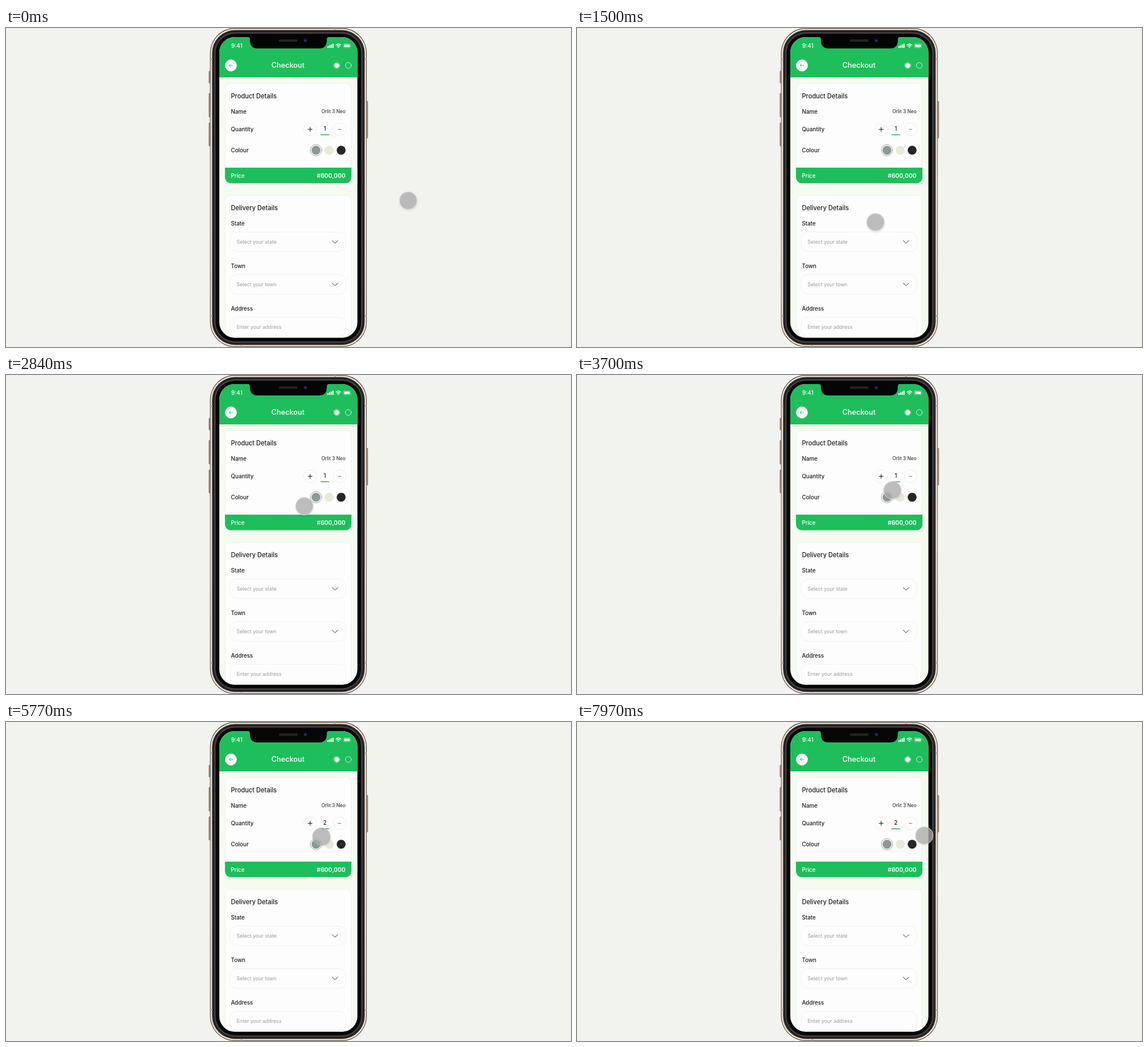
An HTML page for the animation above (8 s loop, 996 by 562 pixels).

```html
<!DOCTYPE html>
<html lang="en">
<head>
<meta charset="utf-8">
<title>Checkout</title>
<style>
  html, body { margin: 0; width: 100%; height: 100%; overflow: hidden; background: #f2f2ee; }
  svg { display: block; width: 996px; height: 562px; }
  text { font-family: Inter, "Open Sans", sans-serif; font-weight: 500; fill: #1b1b1b; }
  .title { font-size: 11.1px; }
  .label { font-size: 9.8px; }
  .hint { font-size: 8.9px; font-weight: 400; fill: #9a9a9a; }
  .light { fill: #fff; }
  .line { fill: none; stroke-linecap: round; stroke-linejoin: round; }
  .card { fill: #fdfdfd; stroke: #ebf3e7; }
  .field { fill: #fdfdfd; stroke: #f0f2ea; }
</style>
</head>
<body>
<svg viewBox="0 0 996 562">
  <defs>
    <clipPath id="screen"><rect x="376" y="16" width="243.5" height="529.5" rx="27"/></clipPath>
    <linearGradient id="rim" x2="0" y2="1">
      <stop stop-color="#57483c"/><stop offset=".5" stop-color="#8a7560"/><stop offset="1" stop-color="#5d4d40"/>
    </linearGradient>
    <filter id="soft" x="-50%" y="-50%" width="200%" height="200%"><feGaussianBlur stdDeviation="1.5"/></filter>
  </defs>

  <g id="phone">
    <g fill="#a58d79" stroke="#6b594b" stroke-width=".6">
      <rect x="357.8" y="76" width="3" height="21" rx="1"/>
      <rect x="357.8" y="115" width="3" height="42" rx="1"/>
      <rect x="357.8" y="167" width="3" height="41" rx="1"/>
      <rect x="634.7" y="129" width="3" height="65" rx="1"/>
    </g>
  </g>

  <g clip-path="url(#screen)">
    <rect x="376" y="16" width="244" height="530" fill="#f6fbf2"/>
    <rect x="376" y="16" width="244" height="71" fill="#1dbe5b"/>

    <text class="light" x="397" y="34.6" font-size="10">9:41</text>
    <g fill="#fff">
      <rect x="566.5" y="32" width="2" height="3" rx=".5"/>
      <rect x="569.5" y="30.6" width="2" height="4.4" rx=".5"/>
      <rect x="572.5" y="29" width="2" height="6" rx=".5"/>
      <rect x="575.5" y="27.5" width="2" height="7.5" rx=".5"/>
      <rect x="596" y="29.2" width="10.2" height="4.4" rx="1"/>
      <circle cx="586" cy="34" r="1.1"/>
    </g>
    <g class="line" stroke="#fff">
      <path d="M581.7 30.1q4.3-3.8 8.6 0M583.5 32q2.5-2 5 0" stroke-width="1.3"/>
      <rect x="594.6" y="27.9" width="13" height="7" rx="2" stroke-width=".6" opacity=".6"/>
    </g>

    <circle cx="396.5" cy="66" r="10.4" fill="#fff"/>
    <path class="line" d="M399.8 66h-6.6m2.7-2.8l-2.8 2.8 2.8 2.8" stroke="#2cc267"/>
    <text class="light" x="497" y="70.2" font-size="12.8" text-anchor="middle">Checkout</text>
    <g class="line" stroke="#fff" stroke-width=".8">
      <circle cx="583" cy="66" r="5.3" stroke-width=".6"/>
      <circle cx="583" cy="66" r="4.2" fill="#fff" stroke="none"/>
      <circle cx="603.5" cy="66" r="5.1"/>
    </g>

    <rect class="card" x="386.5" y="97.5" width="222" height="175.5" rx="9"/>
    <path d="M386 246h223v17a10.5 10.5 0 0 1-10.5 10.5h-202A10.5 10.5 0 0 1 386 263z" fill="#1dbe5b"/>
    <text class="title" x="396.5" y="123.7">Product Details</text>
    <text class="label" x="396.5" y="151">Name</text>
    <text x="598.5" y="150.4" font-size="8.4" text-anchor="end" style="font-weight:400">Orlit 3 Neo</text>
    <text class="label" x="396.5" y="182.2">Quantity</text>
    <text class="label" x="396.5" y="219.2">Colour</text>
    <text class="label light" x="396.5" y="263.6">Price</text>
    <text class="light" x="598.5" y="263.8" font-size="10.5" style="font-weight:600" text-anchor="end">#600,000</text>

    <g fill="#fdfdfd" stroke="#eeefea">
      <circle cx="536" cy="178.5" r="11.4"/>
      <circle cx="588" cy="178.5" r="11.4"/>
    </g>
    <path class="line" d="M532.6 178.5h7M536.1 175v7" stroke="#222" stroke-width="1.2"/>
    <path class="line" d="M585.6 178.5h4.8" stroke="#777"/>
    <text id="one" x="562" y="181" font-size="9.8" text-anchor="middle">1</text>
    <text id="two" x="562" y="181" font-size="9.8" text-anchor="middle">2</text>
    <path d="M554.5 188.1h15.2" stroke="#2fae62" stroke-width="1.5"/>

    <circle class="line" cx="546.5" cy="215.3" r="10" stroke="#849087" stroke-width=".8"/>
    <circle cx="546.5" cy="215.3" r="7.9" fill="#8f9993"/>
    <circle cx="569.8" cy="215.3" r="7.9" fill="#e7ead6"/>
    <circle cx="590.8" cy="215.3" r="7.9" fill="#272526"/>

    <rect class="card" x="386.5" y="295" width="222" height="280" rx="9"/>
    <text class="title" x="396.5" y="321">Delivery Details</text>
    <g id="fields"></g>
  </g>

  <g id="notch">
    <path d="M426 15.5q4 .5 4 4.5v2q0 14 14 14h107.5q14 0 14-14v-2q0-4 4-4.5z" fill="#050505"/>
    <rect x="481" y="20" width="33" height="4.5" rx="2.2" fill="#242323"/>
    <circle cx="527.7" cy="22.2" r="3.4" fill="#141626"/>
    <circle cx="527.7" cy="22.2" r="1.8" fill="#28347a"/>
  </g>

  <g id="cursor">
    <circle cx=".5" cy="1.5" r="16" fill="#000" opacity=".1" filter="url(#soft)"/>
    <circle r="16" fill="#b0b0b0" opacity=".76"/>
    <circle id="ring" class="line" r="15.7" stroke="#fff" stroke-width=".9" opacity=".7"/>
  </g>
</svg>
<script>
  const LOOP = 8000;
  const NS = "http://www.w3.org/2000/svg";
  const $ = id => document.getElementById(id);

  function add(parent, tag, attrs, text = "") {
    const node = document.createElementNS(NS, tag);
    for (const key in attrs) node.setAttribute(key, attrs[key]);
    node.textContent = text;
    parent.append(node);
  }

  // Nested shells from the metal rim to the black bezel: inset, fill.
  [[0, "url(#rim)"], [1.2, "#efe7df"], [3.6, "#3d3530"], [5, "#201f1e"],
   [7.5, "#484747"], [9.5, "#161616"], [11, "#050505"]].forEach(([inset, fill]) =>
    add($("phone"), "rect", {
      x: 359.6 + inset, y: inset, width: 276.4 - 2 * inset, height: 562 - 2 * inset,
      rx: 44 - inset, fill
    }));
  // Antenna breaks in the rim
  [[360, 54, 4, 2], [360, 506, 4, 2], [632, 54, 4, 2], [632, 506, 4, 2],
   [579, 0, 2, 3], [414, 559, 2, 3]].forEach(([x, y, width, height]) =>
    add($("phone"), "rect", { x, y, width, height, fill: "#a8998b" }));

  ["State", "Town", "Address"].forEach((name, i) => {
    const top = 359.5 + i * 75, group = $("fields");
    const verb = i < 2 ? "Select" : "Enter";
    add(group, "text", { class: "label", x: 396.5, y: top - 11.3 }, name);
    add(group, "rect", { class: "field", x: 395, y: top, width: 204, height: 34.5, rx: 12 });
    add(group, "text", { class: "hint", x: 406.5, y: top + 20.6 }, `${verb} your ${name.toLowerCase()}`);
    if (i < 2) add(group, "path", {
      class: "line", d: `M575.2 ${top + 15}l4.8 4.6 4.8-4.6`, stroke: "#777", "stroke-width": 1.1
    });
  });

  function play(id, steps, toFrame) {
    const frames = steps.map(([time, ...values]) => ({ offset: time / LOOP, ...toFrame(...values) }));
    $(id).animate(frames, { duration: LOOP, iterations: Infinity });
  }

  // time, x, y, easing to the next step
  play("cursor", [
    [0, 709, 304], [860, 709, 304, "ease-in"], [1070, 612, 358],
    [1250, 552, 364, "ease-out"], [1550, 525, 341, "ease-in"], [1970, 521, 286],
    [2400, 522, 246, "ease-out"], [2840, 526, 231, "ease-in-out"],
    [3700, 556, 203], [4700, 556, 203], [4940, 556, 202],
    [6750, 556, 202, "ease-in-out"], [7300, 612, 200], [LOOP, 612, 200]
  ], (x, y, easing = "linear") => ({ transform: `translate(${x}px, ${y}px)`, easing }));

  const fade = opacity => ({ opacity });
  play("one", [[0, 1], [4940, 1], [4940, 0], [LOOP, 0]], fade);
  play("two", [[0, 0], [4940, 0], [4940, 1], [LOOP, 1]], fade);
  play("ring", [[0, .7], [4900, .7], [4980, .1], [6650, .1], [6800, .7], [LOOP, .7]], fade);
</script>
</body>
</html>
```
